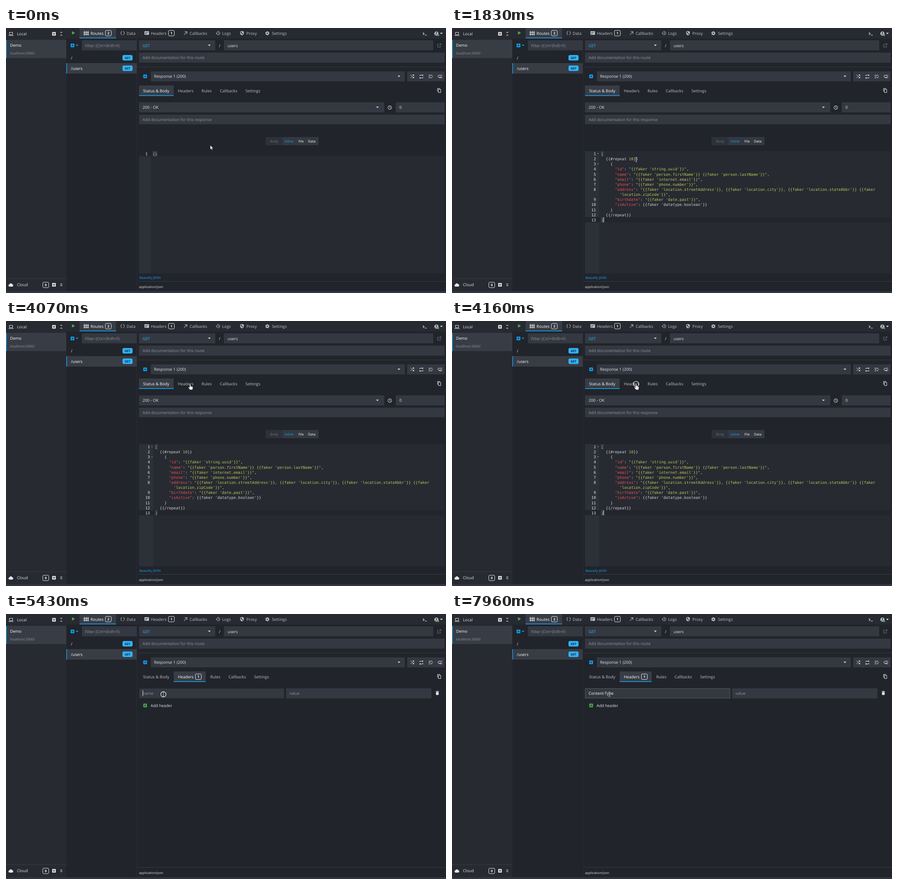
An HTML page that plays this animation: 963x581 px, repeating every 8000 ms.

```html
<!DOCTYPE html>
<html lang="en">
<head>
<meta charset="utf-8">
<title>API mock editor</title>
<style>
  html, body { margin: 0; width: 100%; height: 100%; overflow: hidden; background: #21242a; }
  svg { display: block; width: 100vw; height: 100vh; }
  text { font-family: "Open Sans", "Noto Sans", sans-serif; text-rendering: geometricPrecision; }
  .mono text { font-family: "DejaVu Sans Mono", "Noto Sans Mono", monospace; }
</style>
</head>
<body>
<svg id="stage" viewBox="0 0 963 581"></svg>
<script>
const LOOP = 8000;
const C = {
  bg: '#21242a', panel: '#272a31', input: '#343841', active: '#383c45', line: '#363a43',
  blue: '#0ea5fb', badge: '#2fb4ff', green: '#4caf50', white: '#fff',
  text: '#e2e4e9', tab: '#bec2c9', muted: '#8f949e', dim: '#6b707b',
  key: '#e8505b', str: '#c0c95e', code: '#cdd0d2'
};

// Markup helpers; text is placed by its vertical centre.
const rect = (x, y, w, h, fill, extra = '') =>
  `<rect x="${x}" y="${y}" width="${w}" height="${h}" fill="${fill}" ${extra}/>`;
const text = (x, cy, str, fill = C.text, size = 8.8, extra = '') =>
  `<text x="${x}" y="${cy + size * .36}" font-size="${size}" fill="${fill}" ${extra}>${str}</text>`;
const solid = (d, fill) => `<path d="${d}" fill="${fill}"/>`;
const stroke = (d, color, w = 1) => `<path d="${d}" fill="none" stroke="${color}" stroke-width="${w}"/>`;
const circle = (x, y, r, fill, extra = '') => `<circle cx="${x}" cy="${y}" r="${r}" fill="${fill}" ${extra}/>`;
const group = (id, body, extra = '') => `<g id="${id}" ${extra}>${body}</g>`;
const caretDown = (x, y, fill = C.text) => solid(`M${x - 3} ${y - 1.5}h6l-3 3z`, fill);
const plus = (x, y, fill, hole = C.bg) =>
  rect(x - 4, y - 4, 8, 8, fill, 'rx="1"') + stroke(`M${x - 2.5} ${y}h5M${x} ${y - 2.5}v5`, hole, 1.1);
const chevrons = (x, y, out) => {
  const k = out ? -1.4 : 1.4;
  return stroke(`M${x - 2} ${y - 2.4 - k}l2 ${k}l2 ${-k}M${x - 2} ${y + 2.4 + k}l2 ${-k}l2 ${k}`, C.text, 1.1);
};
const count = (x, cy, n) =>
  rect(x + .5, cy - 6, 13, 12, 'none', `rx="2.5" stroke="${C.text}"`) +
  text(x + 7, cy, n, C.white, 7.3, 'font-weight="700" text-anchor="middle"');
const method = cy => rect(255, cy - 6, 22, 12, C.badge, 'rx="3"') +
  text(266, cy, 'GET', '#1d2026', 6.6, 'font-weight="700" text-anchor="middle"');

function sidebar() {
  return rect(0, 0, 132, 577, C.panel) +
    stroke('M7.5 9.5h7v5h-7zM5.5 16.5h11', C.text) + text(24, 12.7, 'Local') +
    plus(105, 12.7, C.text, C.panel) + chevrons(121, 12.7, false) +
    rect(0, 26, 132, 40, C.active) + rect(0, 26, 1.4, 40, C.blue) +
    text(9, 38.3, 'Demo', C.white) + text(9, 55.5, 'localhost:3000/', C.muted, 7.6) +
    rect(0, 549, 132, 1, C.line) +
    solid('M7.5 567a2.4 2.4 0 0 1-.3-4.7 3.6 3.6 0 0 1 6.6-.6 2.7 2.7 0 0 1-.2 5.3z', C.text) +
    text(24, 563, 'Cloud') + count(80, 563.3, 0) +
    plus(105, 563, C.text, C.panel) + chevrons(121, 563, true);
}

function topBar() {
  const y = 11.5;
  return rect(132, 0, 831, 23, C.panel) +
    solid('M144.5 7v7.5l6.5-3.75z', C.green) +
    rect(161, 0, 80, 22.5, C.active) + rect(161, 21, 80, 1.5, C.blue) +
    stroke('M171.5 6.5v10M175.5 6.5v10M179.5 6.5v10M169.5 9.5h12M169.5 13.5h12', C.white, 1.1) +
    text(185, y, 'Routes', C.white) + count(217, 11.3, 2) +
    stroke('M254 7.5q-2 0-2 1.5v1q0 1-1.2 1.2q1.2.2 1.2 1.2v1q0 1.5 2 1.5M256.5 7.5q2 0 2 1.5v1q0 1 1.2 1.2q-1.2.2-1.2 1.2v1q0 1.5-2 1.5', C.tab) +
    text(264, y, 'Data', C.tab) +
    rect(303, 7, 10, 8, C.tab, 'rx="1"') + stroke('M304.5 9.5h7M304.5 11.5h4M304.5 13.3h3', C.panel, .8) +
    text(317, y, 'Headers', C.tab) + count(355, 11.3, 1) +
    stroke('M389.5 15l6-6.5M391 8h5v5', C.tab, 1.1) + text(402, y, 'Callbacks', C.tab) +
    stroke('M460.8 12a3.7 3.7 0 1 0 1-3.3M464.6 9v2.5l1.8 1.2', C.tab) +
    solid('M459 10.5h3.5l-1.8 2.3z', C.tab) + text(473, y, 'Logs', C.tab) +
    solid('M516.5 6.5l4 1.6v3.2q0 3.3-4 5q-4-1.7-4-5v-3.2z', C.tab) +
    solid('M516.5 8v3.5h2.8q-.3 2-2.8 3.2v-3.2h-2.7v-2.4z', C.panel) + text(526, y, 'Proxy', C.tab) +
    circle(572, y, 2.5, 'none', `stroke="${C.tab}" stroke-width="2"`) +
    circle(572, y, 3.8, 'none', `stroke="${C.tab}" stroke-width="1.3" stroke-dasharray="2 1.98"`) +
    text(582, y, 'Settings', C.tab) +
    stroke('M912.5 10l2.7 2.5l-2.7 2.5M916.5 15.5h4.5', C.text, 1.2) +
    circle(942, 12.2, 4.5, C.tab) + circle(942, 10.8, 1.5, C.panel) +
    stroke('M939.3 14.8q2.7-2.2 5.4 0', C.panel) +
    circle(946, 15.8, 2, C.green) + caretDown(953, 12);
}

function routes() {
  return rect(286, 23, 1, 554, '#292c33') +
    plus(145.5, 38.3, C.blue) + caretDown(155.5, 38.3, C.blue) +
    rect(166, 27, 120, 22, C.input) + text(173, 38.7, 'Filter (Ctrl+Shift+F)', C.muted) +
    text(142, 65.5, '/') + method(65.3) +
    rect(132, 77, 154, 23, C.active) + rect(132, 77, 1.4, 23, C.blue) +
    text(142, 88.7, '/users', C.white) + method(88.3);
}

function routePane() {
  return rect(291, 27, 167, 22, C.input) + text(299, 38.7, 'GET', C.badge) + caretDown(445, 38) +
    text(466, 38.7, '/') + rect(477, 27, 458, 22, C.input) + text(485, 38.7, 'users') +
    stroke('M947.5 35.5h-3v6.5h6.5v-3M949 34.5h3v3M951.8 34.8l-4.3 4.3', C.dim) +
    rect(291, 54, 669, 22, C.input) + text(299, 65.3, 'Add documentation for this route', C.muted, 8.7) +
    rect(288, 85, 675, 1, C.line) +
    plus(304.5, 106, C.blue) + rect(317, 95, 556, 22, C.input) +
    text(324, 106.3, 'Response 1 (200)') + caretDown(860, 106) +
    rect(878, 95, 82, 22, C.input) +
    stroke('M885.5 102.5l7 7M885.5 109.5l2.5-2.5M890 105l2.5-2.5M890 102.5h2.7v2.7M890 109.5h2.7v-2.7', C.text) +
    stroke('M905.5 105v-1.5h7M905.5 109.5h7v-2', C.text) +
    solid('M911 101.5l2.5 2l-2.5 2zM907 107.5l-2.5 2l2.5 2z', C.text) +
    stroke('M925 103.5h8M925 106.5h4M925 109.5h3M929.5 108l1.5 1.8l3-4.5', C.text) +
    stroke('M954.5 103.5h-6.5a2.5 2.5 0 0 0 0 5h2M951.5 106.5h3M951.5 109h3', C.text) +
    solid('M949.5 106.3l2.3 2.2l-2.3 2.2z', C.text) +
    stroke('M944.5 139.5v-7h5.5M946.5 134.5h5v7h-5z', C.text) +
    rect(288, 555, 675, 1, C.line) + text(291, 567.3, 'application/json', C.text, 7.1) +
    rect(0, 577, 963, 4, '#313540');
}

// Tab strip of the response; wide adds the header count.
function tabs(current, wide) {
  const d = wide ? 19 : 0;
  const [x, w] = current ? [367, 51 + d] : [291, 76];
  const names = ['Status &amp; Body', 'Headers', 'Rules', 'Callbacks', 'Settings'];
  const left = [300, 376, 428 + d, 468 + d, 524 + d];
  return rect(x, 126, w, 23, C.active) + rect(x, 147.5, w, 1.5, C.blue) +
    names.map((n, i) => text(left[i], 138, n, i === current ? C.white : C.tab)).join('') +
    (wide ? count(414, 137.5, 1) : '');
}

function statusPane() {
  return rect(291, 163, 537, 22, C.input, 'id="status"') + text(299, 174.2, '200 - OK') + caretDown(813, 174) +
    circle(840, 174.5, 4, 'none', `stroke="${C.text}"`) + stroke('M840 172v2.8l1.8 1', C.text) +
    rect(853, 163, 107, 22, C.input) + text(861, 174.2, '0') +
    rect(291, 190, 669, 21, C.input) + text(299, 201, 'Add documentation for this response', C.muted, 8.7) +
    rect(568, 239, 37, 18, '#2d3139') + rect(605, 239, 79, 18, C.input) +
    text(578, 248.3, 'Body', C.dim, 7.5) + text(610, 248.3, 'Inline', C.blue, 7.5) +
    text(640, 248.3, 'File', C.white, 7.3) + text(661, 248.3, 'Data', C.white, 7.5) +
    rect(291, 270, 669, 268, C.panel) + group('editor', '', 'class="mono"') +
    text(292, 547.3, 'Beautify JSON', '#18a6ff', 7.2);
}

const ROW = 11.15, MONO = 8.4, COL = MONO * .602;
const fake = s => `{{faker '${s}'}}`;
// Each row: line number, column, key, string part, plain tail.
const rows = [
  [1, 0, '', '', '['],
  [2, 2, '', '', `{{#repeat <tspan fill="${C.str}">10</tspan>}}`],
  [3, 4, '', '', '{'],
  [4, 6, 'id', `"${fake('string.uuid')}"`, ','],
  [5, 6, 'name', `"${fake('person.firstName')} ${fake('person.lastName')}"`, ','],
  [6, 6, 'email', `"${fake('internet.email')}"`, ','],
  [7, 6, 'phone', `"${fake('phone.number')}"`, ','],
  [8, 6, 'address', `"${['streetAddress', 'city', 'stateAbbr'].map(s => fake('location.' + s)).join(', ')} {{faker`, ''],
  ['', 8, '', `'location.zipCode'}}"`, ','],
  [9, 6, 'birthdate', `"${fake('date.past')}"`, ','],
  [10, 6, 'isActive', '', fake('datatype.boolean')],
  [11, 4, '', '', '}'],
  [12, 2, '', '', '{{/repeat}}'],
  [13, 0, '', '', ']']
];
const span = (s, fill) => s ? `<tspan fill="${fill}">${s}</tspan>` : '';
const bracket = (x, y) => rect(x + .5, y + .5, 5, 10, 'none', 'stroke="#4b505a" stroke-width=".7"');
const fold = (x, y) => solid(`M${x - 1.8} ${y - .8}h3.6l-1.8 2z`, C.muted);

function editor(t) {
  const full = t >= 1830, left = full ? 326.5 : 321, gutter = full ? 322 : 317;
  const shown = full ? rows : [[1, 0, '', '', t < 1180 ? '{}' : t < 1550 ? '{' : '']];
  const last = 270 + (shown.length - 1) * ROW;
  let out = rect(291, 270, gutter - 291, 268, '#2c3038') + rect(291, last, 669, 11, '#22252b');
  if (full) out += fold(319.5, 275.5) + fold(319.5, 298) + bracket(326, 270) + bracket(326, last);
  else if (t < 1180) out += bracket(320.5, 270) + bracket(325.5, 270);
  else if (t < 1550) out += fold(314.5, 275.5);
  shown.forEach(([n, col, key, str, tail], i) => {
    const y = 275.9 + i * ROW;
    const body = (key ? span(`"${key}"`, C.key) + span(': ', C.code) : '') + span(str, C.str) + span(tail, C.code);
    out += text(full ? 315 : 310, y, n, C.text, MONO, 'text-anchor="end"') +
      text(left + col * COL, y, body, C.code, MONO);
  });
  const on = within(t, [[630, 2450], [3000, 3610], [4160, 4250]]);
  const cx = full ? 331.3 : t < 1180 ? 331 : t < 1550 ? 326 : 321;
  return out + (on ? rect(cx, last, 1.2, 11, '#e8eaee') : '');
}

const access = ['Allow-Credentials', 'Allow-Headers', 'Allow-Methods', 'Allow-Origin', 'Expose-Headers'];
const headerNames = [
  'Accept', ...['Charset', 'Encoding', 'Language', 'Ranges'].map(s => 'Accept-' + s),
  ...access.map(s => 'Access-Control-' + s),
  'Content-Security-Policy', 'Content-Type', 'Strict-Transport-Security', 'X-Content-Type-Options'
];
const byTime = (t, list) => list.reduce((v, [at, next]) => t >= at ? next : v, '');
const within = (t, spans) => spans.some(([a, b]) => t >= a && t < b);

function headersPane(t) {
  const row = t >= 4970, y = row ? 201 : 178.5;
  const hot = !row && t >= 4700;
  const add = plus(304.5, y - .5, C.green) + text(316.5, y, 'Add header', hot ? C.white : C.text, 8.7);
  if (!row) return add;
  const name = byTime(t, [[6260, 't'], [6440, 'ty'], [6510, 'typ'], [6680, 'type'], [7500, 'Content-Type']]);
  const border = t >= 5520 ? 'stroke="#535862"' : '';
  return add + rect(291.5, 163.5, 317, 21, C.input, border) + rect(613, 163, 318, 22, C.input) +
    text(299, 174.2, name || 'name', name ? C.white : C.muted, 8.8, 'id="name"') +
    text(620.5, 174.2, 'value', C.muted) +
    solid('M941 171.5h6v5q0 1-1 1h-4q-1 0-1-1zM940.5 169.5h2l.5-.7h2l.5.7h2v1.2h-7z', C.text);
}

const ITEM = 20.4;
let shownTerm = '';
function suggest(term) {
  if (term === shownTerm) return;
  shownTerm = term;
  const menu = $('menu'), match = new RegExp(term, 'gi');
  const items = term ? headerNames.filter(h => h.search(match) >= 0).slice(0, 10) : [];
  const labels = items.map((h, i) => text(298, 197.6 + i * ITEM,
    h.replace(match, m => `<tspan font-weight="700">${m}</tspan>`), i ? C.tab : C.white, 9)).join('');
  menu.innerHTML = labels;
  if (!term) return;
  const w = Math.round(Math.max(...[...menu.children].map(e => e.getComputedTextLength())) + 13);
  menu.innerHTML = rect(292, 187, w, items.length * ITEM, '#2d3038') + rect(292, 187, w, ITEM, C.active) + labels;
}

const pointers =
  group('arrow', '<path d="M0 0v9.5l2.2-2l1.6 3.6l1.5-.7l-1.6-3.4h3.1z" fill="#fff" stroke="#111" stroke-width=".6"/>') +
  group('beam', stroke('M-2-4.8h1.6l.4.4l.4-.4h1.6M0-4.4v8.8M-2 4.8h1.6l.4-.4l.4.4h1.6', '#d4d7dc', .8)) +
  group('hand', '<path d="M-1.2 1Q0-.8 1.2 1V5l4 .9q1.2.3 1 1.6l-.7 4q-.3 1.5-1.2 1.5h-3.6q-1 0-1.6-1L-4 8.3q-.6-1.3.7-1.6L-1.2 8z" fill="#fff" stroke="#111" stroke-width=".7"/>') +
  circle(0, 0, 5.8, 'none', 'id="ring" stroke="#fff" stroke-width="1.1"');

const $ = id => document.getElementById(id);
$('stage').innerHTML = rect(0, 0, 963, 581, C.bg) + sidebar() + topBar() + routes() + routePane() +
  group('tabs', '') + group('statusPane', statusPane()) + group('headersPane', '') + group('menu', '') +
  rect(0, 167, 1, 13, C.text, 'id="caret"') + group('pointer', pointers);

// Pointer moves: start, steps, step length, from, to.
const moves = [
  [180, 6, 90, 447, 257, 403, 288.5],
  [2730, 13, 88, 403, 288.5, 403, 138],
  [4430, 5, 90, 403, 138, 344, 178],
  [4970, 1, 90, 344, 178, 344.5, 176]
];
function pointerAt(t) {
  let x = 447, y = 257;
  for (const [start, n, len, x0, y0, x1, y1] of moves) {
    if (t < start) break;
    const p = Math.min(n, Math.floor((t - start) / len) + 1) / n;
    const e = p * p * (3 - 2 * p);
    x = x0 + (x1 - x0) * e;
    y = y0 + (y1 - y0) * e;
  }
  return [x, y];
}
function pointerKind(t, x, y) {
  const onTab = y > 126 && y < 149 && x > 367;
  if (t < 4250) return onTab ? 'hand' : y >= 270 || (y > 190 && y < 211) ? 'beam' : 'arrow';
  if (t >= 4970) return 'beam';
  return onTab || (y > 169 && x < 366) ? 'hand' : 'arrow';
}

const cache = {};
function fill(id, html) {
  if (cache[id] !== html) $(id).innerHTML = cache[id] = html;
}
const show = (id, on) => $(id).setAttribute('display', on ? 'inline' : 'none');

function draw(t) {
  const body = t < 4250;
  const [x, y] = pointerAt(t), kind = pointerKind(t, x, y);
  show('statusPane', body);
  show('headersPane', !body);
  fill('tabs', tabs(body ? 0 : 1, t >= 4970));
  fill('editor', editor(t));
  fill('headersPane', headersPane(t));
  suggest(byTime(t, [[6350, 't'], [6440, 'ty'], [6510, 'typ'], [6770, 'type'], [7500, '']]));
  $('status').setAttribute('fill', body && y > 163 && y < 185 ? '#3a3e48' : C.input);

  const typing = within(t, [[5430, 5980], [6260, 7220], [7500, 7960]]);
  show('caret', typing);
  if (typing) {
    const w = t < 6260 ? 0 : $('name').getComputedTextLength();
    $('caret').setAttribute('x', Math.floor(299 + w));
  }
  $('pointer').setAttribute('transform', `translate(${x} ${y})`);
  ['arrow', 'beam', 'hand'].forEach(k => show(k, k === kind));
  show('ring', within(t, [[4160, 4340], [4880, 5060], [5430, 5520]]));
}

const begin = performance.now();
function tick() {
  draw((performance.now() - begin) % LOOP);
  requestAnimationFrame(tick);
}
tick();
</script>
</body>
</html>
```
